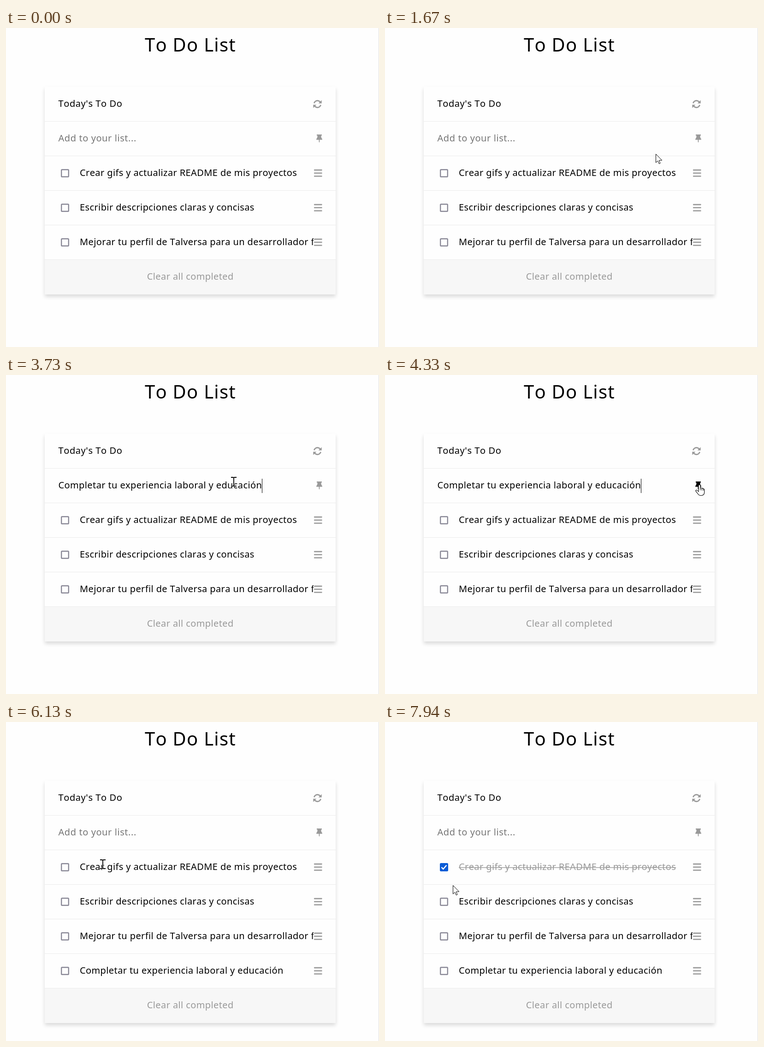
An HTML page with a canvas that plays this animation: 809x692 px, repeating every 8000 ms.

```html
<!DOCTYPE html>
<html lang="es">
<head>
<meta charset="utf-8">
<title>To Do List</title>
<style>
  html, body { margin: 0; width: 100%; height: 100%; overflow: hidden; background: #fefefe; }
  canvas { display: block; }
</style>
</head>
<body>
<canvas id="stage" width="809" height="692"></canvas>
<script>
const ctx = document.getElementById('stage').getContext('2d');
const LOOP = 8000, STEP = 1000 / 15;
const LEFT = 84, TOP = 127, WIDTH = 631, ROW = 75;
const GRAY = '#999', PAPER = '#fefefe';
const NEW_ITEM = 'Completar tu experiencia laboral y educación';
const ITEMS = [
  'Crear gifs y actualizar README de mis proyectos',
  'Escribir descripciones claras y concisas',
  'Mejorar tu perfil de Talversa para un desarrollador full stack',
  NEW_ITEM
];

// Events, counted in steps
const ENTER = 9, FOCUS = 32, PASTE = 46, ADD = 73, REFOCUS = 77, BLUR = 101, CHECK = 104;
const CLICKS = [FOCUS, 70, BLUR];
const CLICK_LENGTH = 3, BLINK = 8.1;

// Each pointer move eases out from wherever the last one ended
const ENTRY = { x: 794, y: 659 };
const MOVES = [
  { from: 9, to: 11, x: 794, y: 565 },
  { from: 15, to: 19, x: 784, y: 360 },
  { from: 22, to: 29, x: 491, y: 231 },
  { from: 56, to: 65, x: 681, y: 236 },
  { from: 80, to: 85, x: 385, y: 303 },
  { from: 88, to: 97, x: 127, y: 310 },
  { from: 112, to: 119, x: 147, y: 354 }
];

const PIN = new Path2D('M674 231H685V233.5H683.4L683.9 238Q686 239.6 686 242.6H673Q673 239.6 675.1 238L675.6 233.5H674ZM678.6 242H680.4V247L679.5 248.5L678.6 247Z');
const ARROW = new Path2D('M.5 .5V19L4.6 15.2L7.4 21.6L10 20.4L7.3 14.2L13.7 14Z');
const HAND = new Path2D('M-1 15V4Q-1 2 1 2Q3 2 3 4V10Q3 8.6 4.8 8.7Q6.4 8.8 6.4 10.5Q7 9.3 8.4 9.6Q9.7 9.9 9.7 11.5Q11.5 10.8 11.7 13V18.5Q11.5 25.5 4.5 25.5Q0 25.5-2.2 22L-7.1 15.7Q-7.6 13.8-5.6 13.5Q-4.2 13.4-1 17Z');
const FINGERS = new Path2D('M3 9.5V14M6.4 10.5V14.5M9.7 11.5V15');
const BEAM = new Path2D('M-6-9H-1.5L0-8L1.5-9H6M0-8V9M-6 10H-1.5L0 9L1.5 10H6');

const easeOut = f => 1 - (1 - f) ** 2;

function pointerAt(k) {
  let { x, y } = ENTRY;
  for (const m of MOVES) {
    const f = easeOut(Math.min(1, Math.max(0, (k - m.from) / (m.to - m.from))));
    x += (m.x - x) * f;
    y += (m.y - y) * f;
  }
  return [x, y];
}

function caretOn(k) {
  if (k < FOCUS || k >= BLUR) return false;
  const since = k < ADD ? k - FOCUS : Math.max(0, k - REFOCUS);
  return Math.floor(since / BLINK) % 2 === 0;
}

function rect(x, y, w, h, color) {
  ctx.fillStyle = color;
  ctx.fillRect(x, y, w, h);
}

function fill(path, color) {
  ctx.fillStyle = color;
  ctx.fill(path);
}

function stroke(path, color, width) {
  ctx.strokeStyle = color;
  ctx.lineWidth = width;
  ctx.stroke(path);
}

function text(str, x, y, color, { size = 20, spacing = 0.39 } = {}) {
  ctx.font = `${size}px "Noto Sans", "Open Sans", sans-serif`;
  ctx.letterSpacing = spacing + 'px';
  ctx.fontKerning = 'none';
  ctx.fillStyle = color;
  ctx.fillText(str, x, y);
  return ctx.measureText(str).width;
}

function refreshIcon(x, y) {
  ctx.save();
  ctx.translate(x, y);
  for (let i = 0; i < 2; i++) {
    const arc = new Path2D();
    arc.arc(0, 0, 7.4, Math.PI * 1.08, Math.PI * 1.8);
    stroke(arc, GRAY, 2.7);
    fill(new Path2D('M9.2-8.6V-1.6H2.2Z'), GRAY);
    ctx.rotate(Math.PI);
  }
  ctx.restore();
}

function checkbox(y, checked, hover) {
  const box = new Path2D();
  if (!checked) {
    box.roundRect(120.2, y - 7.8, 15.6, 15.6, 1.6);
    stroke(box, '#8b8a98', 2.4);
    return;
  }
  box.roundRect(119, y - 9, 18, 18, 2.5);
  fill(box, hover ? '#1f74fa' : '#0a5cd6');
  stroke(new Path2D(`M122.5 ${y + .2}L126.3 ${y + 4}L133.4 ${y - 4.2}`), '#fff', 2.4);
}

function menuIcon(mid) {
  for (let i = -1; i <= 1; i++) {
    const bar = new Path2D();
    bar.roundRect(668, mid + i * 6.7 - 1.3, 17.6, 2.6, 0.8);
    fill(bar, GRAY);
  }
}

function item(label, top, checked, hover) {
  const mid = top + 38;
  checkbox(mid, checked, hover);
  ctx.save();
  ctx.beginPath();
  ctx.rect(160, top, 507, ROW);
  ctx.clip();
  const w = text(label, 160, top + 44, checked ? GRAY : '#000');
  if (checked) rect(160, mid, w, 1.4, GRAY);
  ctx.restore();
  menuIcon(mid - 0.2);
}

function inputRow(k, x, y) {
  const base = TOP + ROW + 44, left = 113.5;
  const typed = k >= PASTE && k < ADD;
  const w = typed
    ? text(NEW_ITEM, left, base, '#000')
    : text('Add to your list...', left, base, '#757575', { spacing: 0.58 });
  if (caretOn(k)) rect(typed ? Math.round(left + w) : 114, 225, 1, 31, '#000');
  fill(PIN, overPin(x, y) ? '#000' : GRAY);
}

function card(k, x, y) {
  const count = k >= ADD ? 4 : 3;
  const footer = TOP + ROW * (count + 2);

  ctx.save();
  ctx.shadowColor = 'rgba(0,0,0,.14)';
  ctx.shadowBlur = 8;
  ctx.shadowOffsetY = 5;
  rect(LEFT, TOP, WIDTH, footer + ROW + 1 - TOP, PAPER);
  ctx.restore();

  rect(LEFT, footer, WIDTH, ROW + 1, '#f7f7f7');
  for (let i = 1; i <= count + 2; i++) rect(LEFT, TOP + ROW * i, WIDTH, 1, '#ebebeb');

  text("Today's To Do", 113.5, TOP + 44, '#000', { spacing: 0.58 });
  refreshIcon(675.5, 165);
  inputRow(k, x, y);

  const hover = x >= 119 && x < 138 && y >= 306 && y < 325;
  for (let i = 0; i < count; i++) {
    item(ITEMS[i], TOP + ROW * (i + 2), i === 0 && k >= CHECK, hover);
  }

  ctx.textAlign = 'center';
  text('Clear all completed', 399.7, footer + 44, GRAY);
  ctx.textAlign = 'left';
}

function overPin(x, y) {
  return x >= 670 && x <= 690 && y >= 228 && y <= 250;
}

function overText(x, y) {
  const dy = (y - TOP) % ROW;
  const start = y < TOP + 2 * ROW ? 114 : 160;
  return y > TOP + ROW && x >= start && x < 667 && dy >= 23 && dy <= 54;
}

function pointer(k, x, y) {
  if (CLICKS.some(c => k >= c && k < c + CLICK_LENGTH)) {
    const glow = new Path2D();
    glow.arc(x, y, 15, 0, Math.PI * 2);
    fill(glow, 'rgba(255,255,0,.47)');
  }
  ctx.save();
  ctx.translate(Math.round(x), Math.round(y));
  if (overPin(x, y)) {
    fill(HAND, '#fff');
    stroke(HAND, '#000', 1.1);
    stroke(FINGERS, '#000', 1);
  } else if (overText(x, y)) {
    ctx.translate(3, 0);
    stroke(BEAM, '#fff', 3.4);
    stroke(BEAM, '#000', 1.8);
  } else {
    fill(ARROW, '#fff');
    stroke(ARROW, '#000', 1);
  }
  ctx.restore();
}

function draw(time) {
  const k = Math.floor((time % LOOP + 10) / STEP);
  const [x, y] = pointerAt(k);
  rect(0, 0, 809, 692, PAPER);
  rect(808, 0, 1, 692, '#e2e2e2');
  text('To Do List', 301, 51, '#000', { size: 40, spacing: 1.25 });
  card(k, x, y);
  if (k >= ENTER) pointer(k, x, y);
}

const start = performance.now();
function tick() {
  draw(performance.now() - start);
  requestAnimationFrame(tick);
}
tick();
</script>
</body>
</html>
```
